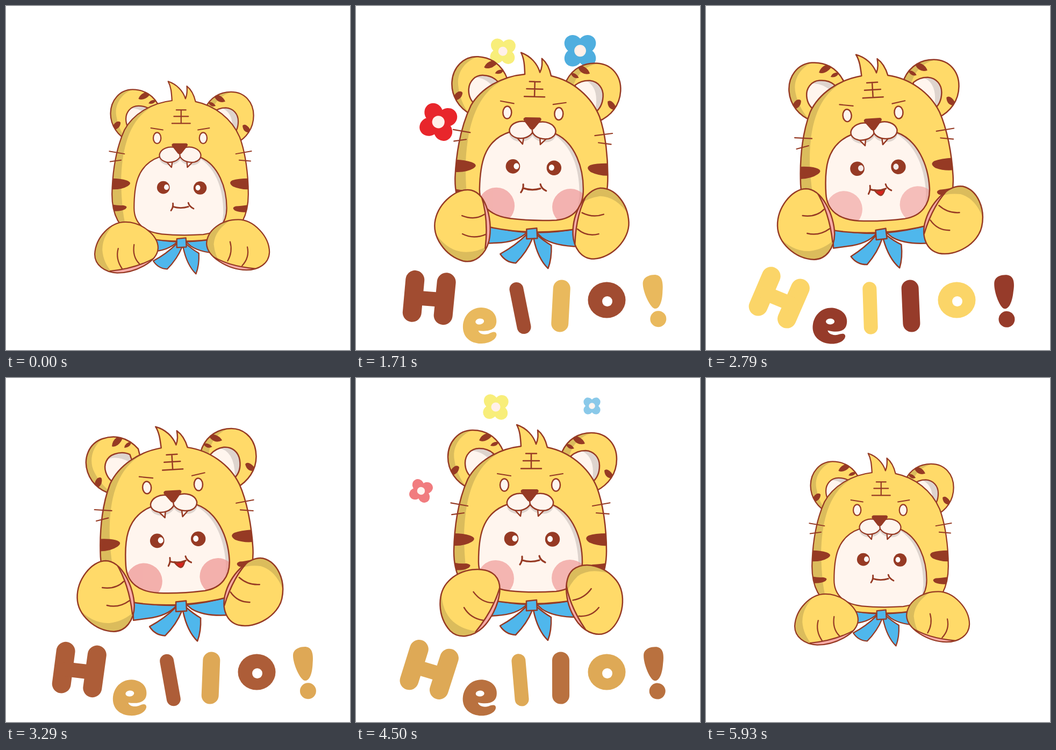
An HTML page that plays this animation: 640x640 px, repeating every 6000 ms.

```html
<!DOCTYPE html>
<html lang="en">
<head>
<meta charset="utf-8">
<title>Hello tiger</title>
<style>
  html, body { margin: 0; width: 100%; height: 100%; overflow: hidden; background: #fff; }
  svg { display: block; width: 100vw; height: 100vh; }
  .line { fill: none; stroke: #963a24; stroke-width: 2.5; stroke-linecap: round; stroke-linejoin: round; }
  .thin { stroke-width: 2.2; }
  .bold { stroke-width: 3.2; }
  .fur { fill: #ffda69; }
  .shade { fill: #dbbc5c; }
  .skin { fill: #fff5ee; }
  .dim { fill: #ded4ce; }
  .mark { fill: #963a24; }
  .blue { fill: #4fb7ec; }
  .pad { fill: #f8aba8; }
  .tongue { fill: #d8231f; }
  .blush { fill: #ef9a98; }
  .letter { stroke-linecap: round; }
  .letter line { stroke: currentColor; }
  .letter path, .letter circle, .letter ellipse { fill: currentColor; }
  .letter .hole { fill: #fff; }
</style>
</head>
<body>
<svg viewBox="0 0 640 640" aria-label="Hello!">
  <defs>
    <path id="earL" d="M274 136C262 108 240 97 217 97C190 97 171 120 171 147C171 172 186 194 210 205L270 190Z"/>
    <path id="earR" d="M383 138C394 113 415 102 438 102C467 102 485 124 485 151C485 178 470 198 447 210L390 190Z"/>
    <path id="innerL" d="M256 141C249 134 240 131 229 131C213 131 203 144 203 158C203 172 209 181 218 187L256 180Z"/>
    <path id="innerR" d="M400 145C408 138 417 135 427 135C443 136 453 148 453 163C453 178 448 188 438 195L405 185Z"/>
    <path id="head" d="M307 127C306 110 305 98 299 87C317 93 330 107 335 123C339 114 339 107 338 97C348 105 353 116 356 129C396 137 432 165 448 203C460 235 466 280 466 322C466 365 450 398 418 411Q375 420 326 420Q275 420 230 409C196 394 182 362 182 322C183 275 190 228 208 188C226 155 264 132 307 127Z"/>
    <path id="face" d="M228 342C228 300 232 252 282 235Q324 218 366 236C404 252 421 300 421 342C421 374 402 394 372 397Q325 400 286 396C250 392 228 374 228 342Z"/>
    <path id="muzzle" d="M324 235C318 245 305 248 295 246C285 243 280 237 281 230C284 218 300 212 314 216L334 216C348 212 364 218 367 230C368 238 362 244 354 246C343 248 330 245 324 235Z"/>
    <path id="pawL" d="M158 435C160 400 190 368 222 368C255 368 290 395 290 422C289 452 240 474 205 474C178 473 158 457 158 435Z"/>
    <path id="pawR" d="M367 413C368 385 398 363 433 363C465 363 498 398 498 431C497 455 475 468 450 468C410 467 368 440 367 413Z"/>
    <clipPath id="inEarL"><use href="#earL"/></clipPath>
    <clipPath id="inEarR"><use href="#earR"/></clipPath>
    <clipPath id="inInnerL"><use href="#innerL"/></clipPath>
    <clipPath id="inInnerR"><use href="#innerR"/></clipPath>
    <clipPath id="inHead"><use href="#head"/></clipPath>
    <clipPath id="inFace"><use href="#face"/></clipPath>
    <clipPath id="inPawL"><use href="#pawL"/></clipPath>
    <clipPath id="inPawR"><use href="#pawR"/></clipPath>
  </defs>

  <g id="flowers"></g>

  <g id="body">
    <g id="ears1">
      <use href="#earL" class="fur"/>
      <g clip-path="url(#inEarL)">
        <path class="shade" d="M217 97C192 106 179 130 183 152Q187 180 206 204L165 200V95Z"/>
        <path class="mark" d="M229 116Q233 106 243 103Q250 101 254 106Q249 114 240 117Q233 119 229 116ZM250 126Q254 117 266 119Q262 129 250 126ZM174 182Q175 169 184 164Q190 162 192 166Q191 180 174 182Z"/>
      </g>
      <use href="#innerL" class="skin"/>
      <path class="dim" clip-path="url(#inInnerL)" d="M211 136Q232 134 250 153L262 142L240 125H215Z"/>
      <use href="#innerL" class="line"/><use href="#earL" class="line"/>
    </g>
    <g id="ears2">
      <use href="#earR" class="fur"/>
      <g clip-path="url(#inEarR)">
        <path class="shade" d="M440 102Q407 111 397 144L378 146V98Z"/>
        <path class="mark" d="M402 109Q407 106 415 110Q423 114 426 122Q418 125 411 121Q405 117 402 109ZM390 123Q400 121 406 131Q396 135 390 123ZM462 172Q466 168 472 173Q478 178 480 187Q463 188 462 172Z"/>
      </g>
      <use href="#innerR" class="skin"/>
      <path class="dim" clip-path="url(#inInnerR)" d="M415 134Q448 144 439 195H460V130Z"/>
      <use href="#innerR" class="line"/><use href="#earR" class="line"/>
    </g>

    <path class="line blue" style="fill:#4fb7ec" d="M236 408Q280 420 318 421Q300 440 262 442L236 444Z"/>
    <path class="line blue" style="fill:#4fb7ec" d="M336 421Q375 420 417 411L417 445Q370 446 346 430Z"/>

    <use href="#head" class="fur"/>
    <g clip-path="url(#inHead)">
      <path class="shade" d="M307 128C250 133 203 175 201 295Q202 365 214 400L175 400V120Z"/>
      <path class="mark" d="M180 289Q200 289 212 293Q226 298 215 305Q202 313 180 312ZM180 343Q195 346 205 345Q217 347 210 353Q200 359 180 357ZM468 289Q445 289 433 293Q423 298 434 306Q450 313 468 312ZM468 344Q450 347 440 347Q430 350 438 356Q450 361 468 359Z"/>
    </g>
    <use href="#head" class="line"/>
    <path id="whiskL1" class="line thin" d="M176 238H208"/>
    <path id="whiskL2" class="line thin" d="M179 258L201 251"/>
    <path id="whiskR1" class="line thin" d="M440 238H473"/>
    <path id="whiskR2" class="line thin" d="M447 251L470 257"/>

    <g id="brow">
      <path class="line" d="M316 140.500H336M311 154H341M307 168.500H345M326 140.500V168"/>
      <path class="line thin" d="M263 178L288 182M361 182L385 178"/>
      <g class="line" style="fill:#fff5ee"><ellipse cx="276" cy="199" rx="8" ry="11.500"/><ellipse cx="372" cy="199" rx="8" ry="11.500"/></g>
    </g>

    <g id="visage">
      <use href="#face" class="skin"/>
      <g clip-path="url(#inFace)">
        <path class="dim" d="M350 230C398 252 414 300 414 352L411 378L430 370V225Z"/>
        <use href="#muzzle" class="dim" y="6"/>
        <g id="cheeks" class="blush"><circle cx="260" cy="373" r="34"/><circle cx="398" cy="372" r="34"/></g>
      </g>
      <use href="#face" class="line"/>
      <path class="line" style="fill:#fff5ee" d="M296 246L306 257L308 243ZM338 243L339 257L350 246Z"/>
      <use href="#muzzle" class="skin"/><use href="#muzzle" class="line"/>
      <path class="mark" d="M310 207H337Q342 209 338 214L327 228Q323 232 319 228L308 214Q304 209 310 207Z"/>
      <path class="line" d="M323 228L324 236"/>
      <circle class="mark" cx="289" cy="299" r="13.300"/><circle class="mark" cx="365.500" cy="300" r="13.700"/>
      <g id="glints" fill="#fff"><ellipse cx="295.500" cy="298.500" rx="5" ry="5.700"/><ellipse cx="361" cy="299.500" rx="5" ry="5.700"/></g>
      <g id="mouth">
        <path id="tongue" class="line" style="fill:#d8231f" d="M317 340Q328 344 339 340Q335 352 329 351Q322 348 317 340Z"/>
        <path class="line bold" d="M309 332Q310 340 305 347M309 339Q325 344 341 339M341 331Q343 339 352 343"/>
      </g>
    </g>
  </g>

  <g id="bow" class="line" style="fill:#4fb7ec">
    <path d="M317 425Q296 446 268 461Q278 477 297 478Q318 457 328 432Z"/>
    <path d="M330 432Q338 470 357 488Q364 470 363 445Q348 436 337 426Z"/>
    <path d="M317 415L336 413L337 432L317 433Z"/>
  </g>

  <g id="hand1">
    <use href="#pawL" class="fur"/>
    <g clip-path="url(#inPawL)">
      <path class="shade" d="M206 366Q173 394 174 427Q176 453 195 474H150V366Z"/>
      <path class="line" style="fill:#f8aba8" d="M190 470Q245 465 286 441L296 480H190Z"/>
    </g>
    <use href="#pawL" class="line"/>
    <path class="line" d="M207 423Q201 445 215 465M240 415Q236 440 251 455"/>
  </g>
  <g id="hand2">
    <use href="#pawR" class="fur"/>
    <g clip-path="url(#inPawR)">
      <path class="shade" d="M420 362Q384 384 382 414Q384 436 396 455L360 450V362Z"/>
      <path class="line" style="fill:#f8aba8" d="M374 436Q410 460 468 465L466 480H365Z"/>
    </g>
    <use href="#pawR" class="line"/>
    <path class="line" d="M416 409Q422 430 411 449M452 420Q457 442 441 459"/>
  </g>

  <g id="word">
    <g class="letter"><g stroke-width="35"><line x1="109" y1="510" x2="105" y2="571"/><line x1="167.500" y1="513" x2="163" y2="575"/></g><line stroke-width="27" x1="112" y1="543.500" x2="160" y2="546"/></g>
    <g class="letter"><path d="M261 588C262 570 248 561 232 561C212 562 199 578 199 597C199 616 213 628 233 628C248 628 262 620 262 610C261 604 255 605 248 609C238 613 229 609 228 604C245 606 260 602 261 588Z"/><ellipse class="hole" cx="230" cy="587" rx="8" ry="5.500" transform="rotate(-10 230 587)"/></g>
    <g class="letter"><line stroke-width="26" x1="298" y1="527" x2="313" y2="597"/></g>
    <g class="letter"><line stroke-width="32" x1="383.500" y1="525.500" x2="378.500" y2="590.500"/></g>
    <g class="letter"><ellipse cx="466.500" cy="547" rx="35" ry="33.500"/><circle class="hole" cx="467.500" cy="549.500" r="9.500"/></g>
    <g class="letter"><path d="M533 516C533 505 545 500 556 500C568 501 571 512 570 530C570 550 565 563 557 563C548 563 533 532 533 516Z"/><circle cx="563" cy="582" r="15"/></g>
  </g>
</svg>

<script>
const LOOP = 6000, STEP = LOOP / 84;
const $ = id => document.getElementById(id);
const mix = (a, b, k) => a + (b - a) * k;
const smooth = k => k * k * (3 - 2 * k);
const linear = k => k;

// Value at time t from a table of [time, value] steps.
function at(t, steps, ease = linear) {
  if (t <= steps[0][0]) return steps[0][1];
  for (let i = 1; i < steps.length; i++) {
    const [t0, v0] = steps[i - 1], [t1, v1] = steps[i];
    if (t <= t1) return mix(v0, v1, ease((t - t0) / (t1 - t0)));
  }
  return steps[steps.length - 1][1];
}
const move = (el, value) => el.setAttribute('transform', value);
const turn = (a, x, y) => `rotate(${a} ${x} ${y})`;

const SIZE = [[0, 0], [540, 1], [5430, 1], [5786, .27], [5925, 0]];
const TILT = [[1430, 0], [2140, 6.5], [2290, 6], [3000, -6], [3290, -3.5], [3790, 0]];
const EAR_L = [[1430, 0], [2290, 13], [3290, -15], [3790, 0]];
const EAR_R = [[1430, 0], [2290, 13], [3290, -5], [3790, 0]];
const RAISE = [[1430, 0], [1710, 1], [4360, 1], [4640, 0]];
const WORD = [[0, 0], [290, 1], [5786, 1], [5857, .5], [5925, 0]];
const BLUSH_ON = [[780, 0], [1000, .3], [1500, 1], [5300, 1], [5700, 0]];

// Repeating every 1500 ms.
const BOW = [[0, 0], [500, 0], [790, -5], [930, -13], [1000, -10], [1150, -8], [1400, 0]];
const SQUINT = [[0, 0], [500, .05], [790, .9], [1000, 1], [1150, 1], [1400, 0]];
const WHISK = [[0, 10], [290, 7], [500, 4], [790, 1], [1000, -4], [1400, 10]];
const BLUSH = [[0, .7], [290, .76], [500, .66], [790, .47], [1000, .47], [1500, .7]];

// Repeating every 800 ms.
const TINT_ODD = [[0, 0], [400, 1], [690, .1], [730, .04], [800, 0]];
const TINT_EVEN = [[0, .9], [90, .67], [200, .39], [360, 0], [400, 0], [690, .97], [760, 1], [800, .9]];

// Per letter: pivot and swing for a full tint change.
const LETTERS = [[136, 542, 21], [230, 594, -9], [306, 562, 11], [381, 558, 7], [466, 547, 0], [553, 548, -6]];
const letters = [...document.querySelectorAll('.letter')];

function tint(k) {
  const from = [150, 59, 42], to = [255, 219, 106];
  return `rgb(${from.map((c, i) => Math.round(mix(c, to[i], k)))})`;
}

// Flowers burst from behind the head, then shrink away.
const FLOWERS = [
  { color: '#e8262b', size: 1.36, spin: 18, path: [[215, 225], [187, 222], [121, 210]], fade: [[450, 1], [826, .27], [900, 0]], alpha: [[450, 1], [826, .22]] },
  { color: '#f8ee7a', size: 1, spin: 4, path: [[292, 150], [287, 116], [260, 54]], fade: [[830, 1], [1000, 0]], alpha: [[900, 1], [1000, .6]] },
  { color: '#4faedf', size: 1.28, spin: 0, path: [[380, 150], [394, 116], [439, 52]], fade: [[450, 1], [826, .09], [880, 0]], alpha: [[500, 1], [826, .22]] }
];
for (const f of FLOWERS) {
  f.el = document.createElementNS('http://www.w3.org/2000/svg', 'g');
  const petals = [45, 135, 225, 315].map(a =>
    `<ellipse cx="14" rx="13.500" ry="12.500" transform="rotate(${a})"/>`).join('');
  f.el.innerHTML = `<g fill="${f.color}">${petals}</g><circle r="8.500" fill="#fff0e9"/>`;
  $('flowers').append(f.el);
}

function drawFlowers(t) {
  const age = t >= 3857 ? t - 3857 : t - 1457;
  const shown = age >= 0 && age < 1000;
  for (const f of FLOWERS) {
    f.el.style.display = shown ? '' : 'none';
    if (!shown) continue;
    const pos = i => at(age, [[0, f.path[0][i]], [72, f.path[1][i]], [450, f.path[2][i]]], k => k * (2 - k));
    move(f.el, `translate(${pos(0)} ${pos(1)}) rotate(${f.spin}) scale(${f.size * at(age, f.fade)})`);
    f.el.style.opacity = at(age, f.alpha);
  }
}

function drawWord(t) {
  const show = at(t, WORD), beat = t % 800;
  $('word').style.opacity = show;
  move($('word'), `translate(0 ${18 * (1 - show)})`);
  const odd = at(beat, TINT_ODD), even = at(beat, TINT_EVEN);
  letters.forEach((el, i) => {
    const [x, y, swing] = LETTERS[i];
    const k = i % 2 ? even : odd, rest = i % 2 ? .98 : .04;
    el.style.color = tint(k);
    move(el, turn(swing * (k - rest), x, y));
  });
}

function drawTiger(t) {
  const p = at(t, SIZE, smooth), q = 1 - p;
  const tilt = at(t, TILT, smooth), up = at(t, RAISE, smooth);
  const beat = t % 1500, squint = at(beat, SQUINT), w = at(beat, WHISK);
  const open = t >= 2640 && t < 4430;
  const s = mix(.893, 1, p);
  const grow = `translate(${324 * (1 - s)} ${62.6 * q}) scale(${s})`;
  const sink = tilt * tilt * .12;

  move($('body'), `translate(${-sink * .3} ${sink}) ${turn(tilt, 325, 420)} ${grow}`);
  move($('ears1'), `translate(${8 * q} ${7 * q}) ${turn(at(t, EAR_L, smooth), 232, 168)}`);
  move($('ears2'), `translate(${-8 * q} ${7 * q}) ${turn(at(t, EAR_R, smooth), 400, 178)}`);
  move($('brow'), `translate(0 ${6 * q})`);
  move($('visage'), `translate(0 ${9 * q})`);
  move($('whiskL1'), turn(w, 208, 238));
  move($('whiskL2'), turn(w, 201, 251));
  move($('whiskR1'), turn(-w, 440, 238));
  move($('whiskR2'), turn(-w, 447, 251));
  move($('bow'), `translate(${tilt * .25} ${sink}) ${grow} ${turn(at(beat, BOW), 326, 424)}`);
  move($('mouth'), `translate(328 0) scale(${open ? .91 : 1 - .14 * squint} 1) translate(-328 0)`);
  $('tongue').style.display = open ? '' : 'none';
  $('glints').style.opacity = 1 - .22 * squint;
  $('cheeks').style.opacity = at(beat, BLUSH) * at(t, BLUSH_ON);

  const lean = Math.min(1, Math.abs(tilt) / 3.5);
  const side = Math.max(-1, Math.min(1, tilt / 3.5)) * 2.5;
  const hand = (el, dir, [x, y], [rx, ry], angle, lift) => {
    const dx = dir * 12 * q + up * (dir * 11 * lean + side + rx);
    const dy = 12 * q + up * (ry + lift);
    move(el, `${grow} translate(${dx} ${dy}) ${turn(angle * up, x, y)}`);
  };
  hand($('hand1'), -1, [224, 421], [-25, -15], -91, -Math.max(0, tilt));
  hand($('hand2'), 1, [432.5, 415.5], [21, -13], 102, Math.min(0, tilt));
}

function frame() {
  const now = (performance.now() + 3) % LOOP;
  const t = Math.floor(now / STEP) * STEP;
  drawFlowers(t);
  drawWord(t);
  drawTiger(t);
  requestAnimationFrame(frame);
}
frame();
</script>
</body>
</html>
```
